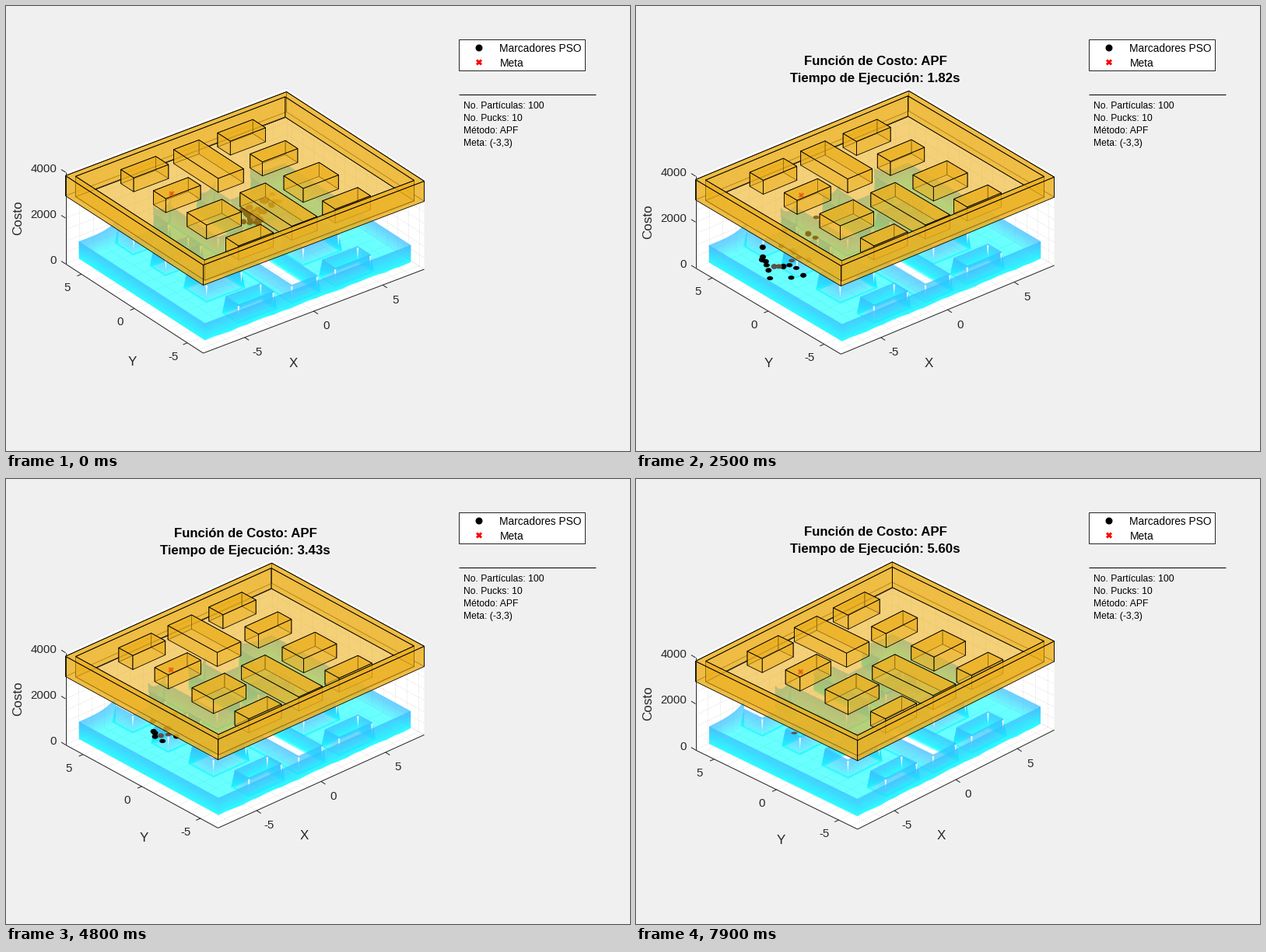
Write a matplotlib script that moves like this. It is 802 by 573 pixels and loops after 8 s.

```python
import numpy as np
import matplotlib.pyplot as plt
from matplotlib.animation import FuncAnimation
from matplotlib.collections import LineCollection, PolyCollection
from matplotlib.patches import PathPatch, Rectangle
from matplotlib.path import Path

W, H, DPI = 802, 573, 100
FRAMES, STEP = 80, 100
PX = 72 / DPI
plt.rcParams["font.family"] = "Liberation Sans"

AX, AY = 8, 6.5            # half sizes of the axes box
ROOM = (-7.59, 7.59, -6.09, 6.09)
FIELD = (-7.45, 7.45, -5.95, 5.95)
OUTER = (-AX, AX, -AY, AY)
BASE, RIM = 8, 30          # heights in pixels above z = 0
SLAB, BLOCK, LID = 87.5, 105.5, 113.5
TOP = 118
ORANGE = (237 / 255, 177 / 255, 32 / 255, 0.6)
CYAN, HAZE = (0, 1, 1, 0.59), (0.5, 0.5, 1, 0.05)
INK = (0.15, 0.15, 0.15)

COLS = [(-4.6, -2.08), (-0.78, 1.05), (2.4, 4.95)]
SIDE_ROWS = [(4.5, 5.7), (1.47, 2.63), (-2.38, -0.55), (-5.4, -4.2)]
MID_ROWS = [(1.5, 5.7), (-5.45, -0.57)]
BLOCKS = [COLS[0] + r for r in SIDE_ROWS] + [COLS[2] + r for r in SIDE_ROWS]
BLOCKS += [COLS[1] + r for r in MID_ROWS]
BLOCKS.sort(key=lambda b: -sum(b))
# blocks next to the back wall open the surface right up to its edge
HOLES = [b[:3] + (FIELD[3] if b[3] == 5.7 else b[3],) for b in BLOCKS]

rng = np.random.RandomState(11)
SWARM = 48
offset = rng.normal(0, 1, (SWARM, 2)).clip(-1.8, 1.8)
offset[::5] += (2.4, -2.8)
spin = rng.uniform(-0.02, 0.02, SWARM)
arrival = 14 + 66 * np.linspace(0, 1, SWARM) ** 2.6
dot_h = rng.uniform(4.5, 7.5, SWARM)
KEYS = [0, 5, 10, 15, 25, 39, 48, 60, 79]
PATH_X = [318, 278, 216, 169, 184, 181, 200, 202, 204]
PATH_Y = [270, 288, 315, 333, 332, 334, 329, 331, 327]
SPREAD_X = [8, 12, 17, 16, 20, 13, 10, 8, 0.5]
SPREAD_Y = [6, 9, 11, 11, 12, 10, 5, 6, 0.5]

fig = plt.figure(figsize=(W / DPI, H / DPI), dpi=DPI, facecolor="#f0f0f0")
ax = fig.add_axes([0, 0, 1, 1])
ax.set_xlim(0.5, W + 0.5)
ax.set_ylim(H, 0)
ax.axis("off")


class View:
    """Affine projection of the slowly turning axes box."""

    def __init__(self, n):
        self.front = np.array([254 + 0.395 * n, 447 + 0.05 * n])
        self.ux = (np.array([538, 339 - 0.2 * n]) - self.front) / (2 * AX)
        self.uy = (np.array([77, 332 + 0.215 * n]) - self.front) / (2 * AY)
        self.zs = 1 + 0.0001 * n

    def __call__(self, x, y, h=0):
        p = self.front + (x + AX) * self.ux + (y + AY) * self.uy
        return p - (0, h * self.zs)

    def quad(self, rect, h):
        """Corners in the order front, right, back, left."""
        return [self(x, y, h) for x, y in corners(rect)]

    def sides(self, rect, lo, hi):
        """Near pair and far pair of upright faces."""
        b, t = self.quad(rect, lo), self.quad(rect, hi)
        f = [[b[i], b[(i + 1) % 4], t[(i + 1) % 4], t[i]] for i in range(4)]
        return [f[3], f[0]], [f[1], f[2]]


def corners(rect):
    x0, x1, y0, y1 = rect
    return [(x0, y0), (x1, y0), (x1, y1), (x0, y1)]


def polys(shapes, face, edge="none", lw=0.8):
    ax.add_collection(PolyCollection(shapes, facecolors=face, edgecolors=edge,
                                     linewidths=lw * PX, zorder=1))


def lines(segs, color="k", lw=1, style="solid"):
    ax.add_collection(LineCollection(segs, colors=[color], linewidths=lw * PX,
                                     linestyles=style, zorder=1))


def label(x, y, s, size=15, ha="center", color=INK, **kw):
    ax.text(x, y + 0.36 * size, s, fontsize=size * PX, ha=ha, va="baseline",
            color=color, **kw)


def curtain(v, a, b, flare=((0, 0), (0, 0)), lift=(0, 0), wave=0, haze=8):
    """Upright piece of the cost surface, cyan at the foot and bluer at the rim."""
    u = np.linspace(0, 1, 25 if wave or any(lift) else 2)
    a, b = np.array(a), np.array(b)
    foot = [a + flare[0], b + flare[1]]
    low = BASE + wave * np.sin(u * 41) * np.sin(u * 17)
    high = RIM + lift[0] * (1 - u) ** 4 + lift[1] * u ** 4

    def row(t):
        p0 = foot[0] + (a - foot[0]) * t
        p1 = foot[1] + (b - foot[1]) * t
        return [v(*(p0 + (p1 - p0) * k), l + (h - l) * t)
                for k, l, h in zip(u, low, high)]

    rim = row(1)[::-1]
    levels = np.linspace(0, 1, haze + 1)[:-1]
    polys([row(t) + rim for t in (0, *levels)], [CYAN] + [HAZE] * haze)


def ring_path(outer, holes):
    parts = [outer] + [h[::-1] for h in holes]
    return Path.make_compound_path(*[Path(p + [p[0]], closed=True) for p in parts])


def fill_path(path, color):
    ax.add_patch(PathPatch(path, facecolor=color, edgecolor="none", zorder=1))


def draw_box(v):
    b, t = v.quad(OUTER, 0), v.quad(OUTER, TOP)
    polys([[b[0], b[1], t[1], t[2], t[3], b[3]]], "white")
    grid = []
    for x in range(-AX, AX + 1):
        grid += [[v(x, -AY), v(x, AY)], [v(x, AY), v(x, AY, TOP)]]
    for y in range(-6, 7):
        grid += [[v(-AX, y), v(AX, y)], [v(AX, y), v(AX, y, TOP)]]
    for h in np.linspace(0, TOP, 9):
        grid += [[v(-AX, AY, h), v(AX, AY, h)], [v(AX, AY, h), v(AX, -AY, h)]]
    lines(grid, (0.86,) * 3, 0.7, (0, (2, 2)))


def draw_axes(v, n):
    b = v.quad(OUTER, 0)
    segs = [[b[3], v(-AX, AY, TOP)], [b[3], b[0]], [b[0], b[1]]]
    for k in (-5, 0, 5):
        p, q = v(k, -AY), v(-AX, k)
        segs += [[p, p + (5.5, 3.6)], [q, q + (-5.5, 2.3)]]
        label(p[0] + 16, p[1] + 18, str(k))
        label(q[0] - 18.5, q[1] + 16.5, str(k))
    for k in range(3):
        p = v(-AX, AY, k * TOP / 2)
        segs.append([p, p + (-5.5, -3.4)])
        label(65.5, p[1] - 5.5, str(2000 * k), ha="right")
    lines(segs, INK)
    label(370 + 0.29 * n, 459 - 0.02 * n, "X", 17)
    label(163 + 0.3 * n, 457 + 0.09 * n, "Y", 17)
    ax.text(16.5, 272.5 + 0.205 * n, "Costo", fontsize=17 * PX, rotation=90,
            ha="center", va="center", color=INK)


def draw_back_wall(v):
    """Back wall, present only between the columns of blocks, with raised ends."""
    y = FIELD[3]
    ends = [FIELD[0], *(x for col in COLS for x in col), FIELD[1]]
    for x0, x1 in zip(ends[::2], ends[1::2]):
        lift = (10 * (x0 > FIELD[0]), 10 * (x1 < FIELD[1]))
        curtain(v, (x0, y), (x1, y), lift=lift)


def draw_tower(v, rect):
    c, d = corners(rect), 0.15
    out = [(-d, -d), (d, -d), (d, d), (-d, d)]
    is_open = rect[3] == FIELD[3]
    for i in (1, 3, 0) if is_open else (1, 2, 3, 0):
        j = (i + 1) % 4
        curtain(v, c[i], c[j], (out[i], out[j]))
    spikes = []
    for x, y in c[:3]:
        p, q = v(x, y, 14), v(x, y, 28)
        spikes.append([p, q + (-1.3, 0), q + (1.3, 0)])
    polys(spikes, (1, 1, 1, 0.85))


def draw_swarm(n):
    cx, cy = np.interp(n, KEYS, PATH_X), np.interp(n, KEYS, PATH_Y)
    sx, sy = np.interp(n, KEYS, SPREAD_X), np.interp(n, KEYS, SPREAD_Y)
    ang = np.linspace(0, 2 * np.pi, 16, endpoint=False)
    shrink = 1 - 0.5 * max(0, n - 60) / 19
    shapes, colors = [], []
    for i in np.flatnonzero(arrival >= n):
        c, s = np.cos(spin[i] * n), np.sin(spin[i] * n)
        ox, oy = offset[i]
        x, y = cx + sx * (ox * c - oy * s), cy + sy * (ox * s + oy * c)
        shapes.append(np.column_stack([x + 4 * np.cos(ang),
                                       y + dot_h[i] / 2 * shrink * np.sin(ang)]))
        colors.append((0.38, 0.3, 0.27) if i % 9 == 2 else (0, 0, 0))
    polys(shapes, colors)


def draw_surface(v, n):
    c = corners(FIELD)
    curtain(v, c[1], c[2])
    draw_back_wall(v)
    fill_path(ring_path(v.quad(FIELD, BASE), [v.quad(b, BASE) for b in HOLES]), CYAN)
    for b in HOLES:
        draw_tower(v, b)
    draw_swarm(n)
    curtain(v, c[3], c[0])
    curtain(v, c[0], c[1], wave=1.6)


def draw_slab(v):
    near, far = v.sides(OUTER, SLAB, LID)
    near_in, far_in = v.sides(ROOM, SLAB, LID)
    polys(far, ORANGE, "k")
    polys([v.quad(ROOM, SLAB)], ORANGE, "k")
    fill_path(ring_path(v.quad(OUTER, SLAB), [v.quad(ROOM, SLAB)]), ORANGE)
    polys(far_in, ORANGE, "k")
    for b in BLOCKS:
        front, back = v.sides(b, SLAB, BLOCK)
        polys(back + front + [v.quad(b, BLOCK)], ORANGE, "k")
    polys(near_in, ORANGE, "k")
    polys(near, ORANGE, "k")
    lid, hole = v.quad(OUTER, LID), v.quad(ROOM, LID)
    fill_path(ring_path(lid, [hole]), ORANGE)
    polys([lid, hole], "none", "k", 0.9)


def cross(x, y, r, color, lw):
    lines([[(x - r, y - r), (x + r, y + r)], [(x - r, y + r), (x + r, y - r)]], color, lw)


def draw_panel():
    ax.add_patch(Rectangle((582, 43), 162, 40, facecolor="white", edgecolor=INK,
                           linewidth=PX, zorder=1))
    ang = np.linspace(0, 2 * np.pi, 24)
    polys([np.column_stack([608.5 + 4.5 * np.cos(ang), 54 + 4.5 * np.sin(ang)])], "k")
    cross(608.5, 72.5, 3, "red", 3)
    label(635, 54, "Marcadores PSO", 13.8, "left", "k")
    label(635, 73, "Meta", 13.8, "left", "k")
    lines([[(582, 114), (758, 114)]])
    info = ["No. Partículas: 100", "No. Pucks: 10", "Método: APF", "Meta: (-3,3)"]
    for k, s in enumerate(info):
        label(589, 128 + 16 * k, s, 12.1, "left", "k")


def draw_title(n):
    if n == 0:
        return
    y = 70 - max(0, (n - 14) // 18)
    label(308, y, "Función de Costo: APF", 16.7, color="k", weight="bold")
    label(308, y + 22, f"Tiempo de Ejecución: {0.07 * (n + 1):.2f}s", 16.7,
          color="k", weight="bold")


def draw(n):
    for artist in [*ax.collections, *ax.patches, *ax.texts]:
        artist.remove()
    v = View(n)
    draw_box(v)
    draw_surface(v, n)
    draw_slab(v)
    cross(*v(-3, 3, SLAB), 2.8, (0.9, 0.25, 0, 0.55), 2.8)
    draw_axes(v, n)
    draw_panel()
    draw_title(n)
    return []


anim = FuncAnimation(fig, draw, frames=FRAMES, interval=STEP, repeat=True,
                     repeat_delay=0, blit=False)
plt.show()
```
